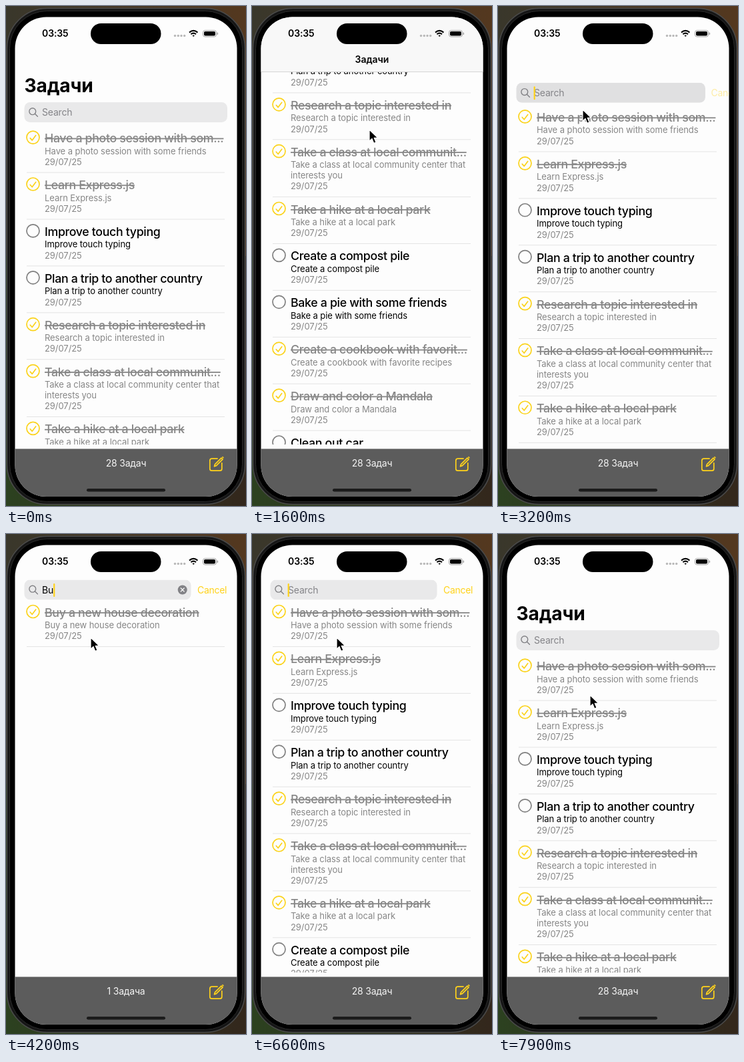
Write an HTML page that moves like this. It is 360 by 748 pixels and loops after 8000 ms.

```html
<!DOCTYPE html>
<html lang="ru">
<head>
<meta charset="utf-8">
<title>Задачи</title>
<style>
html, body { margin: 0; width: 100%; height: 100%; overflow: hidden; background: #17140f; }
svg { display: block; width: 100vw; height: 100vh; }
text { font-family: Inter, "Noto Sans", sans-serif; }
.head { font-size: 17.8px; font-weight: 500; letter-spacing: -.35px; }
.sub, .date { font-size: 13px; letter-spacing: -.07px; }
.date { fill: #868686; }
.done { fill: #868686; }
.done .head { text-decoration: line-through; }
.field { font-size: 14px; letter-spacing: -.2px; }
</style>
</head>
<body>
<svg viewBox="0 0 360 748" xmlns="http://www.w3.org/2000/svg">
  <defs>
    <linearGradient id="wallTop"><stop stop-color="#39372b"/><stop offset="1" stop-color="#54381f"/></linearGradient>
    <linearGradient id="wallLow"><stop stop-color="#2c4120"/><stop offset="1" stop-color="#33271c"/></linearGradient>
    <clipPath id="screen"><rect x="13.5" y="16.500" width="333" height="717.500" rx="47"/></clipPath>
    <clipPath id="listClip"><rect id="listBox" x="13" width="334"/></clipPath>
    <clipPath id="titleClip"><rect x="13" y="98" width="334" height="80"/></clipPath>
    <clipPath id="barClip"><rect id="barBox" x="13" width="334"/></clipPath>
  </defs>
  <rect width="360" height="374" fill="url(#wallTop)"/>
  <rect y="374" width="360" height="374" fill="url(#wallLow)"/>
  <rect x="1.5" y="3.5" width="357" height="742" rx="60" fill="#161616" stroke="#4b4b4b" stroke-width="1.5"/>
  <rect x="5.5" y="7.5" width="349" height="734" rx="56" fill="#000" stroke="#2b2b2b"/>
  <g clip-path="url(#screen)">
    <rect x="13" y="16" width="334" height="719" fill="#fdfdfd"/>
    <g clip-path="url(#listClip)" id="list"></g>

    <g clip-path="url(#titleClip)">
      <text id="title" font-size="28.200" font-weight="700" letter-spacing="-.15">Задачи</text>
    </g>

    <g id="nav">
      <rect x="13" y="16" width="334" height="82" fill="#f8f8f8"/>
      <path d="M13 98.5H347" stroke="#d5d5d5"/>
      <text x="180" y="85" text-anchor="middle" font-size="14" font-weight="600">Задачи</text>
    </g>

    <g clip-path="url(#barClip)">
      <rect id="bar" x="27.5" rx="8.5"/>
      <g id="barBody">
        <g fill="none" stroke="#808084" stroke-width="1.4" stroke-linecap="round">
          <circle cx="39.8" cy="-1.3" r="4.9"/><path d="M43.4 2.3l4 4"/>
        </g>
        <text id="hint" class="field" x="54" y="5" fill="#848488">Search</text>
        <text id="query" class="field" x="54" y="5"></text>
        <rect id="caret" y="-9.5" width="2.200" height="20" rx="1" fill="#ffd21a"/>
        <g id="clear">
          <circle cx="264.7" r="7" fill="#828286"/>
          <path d="M262.2 -2.5l5 5m0-5l-5 5" stroke="#f4f4f4" stroke-width="1.3" stroke-linecap="round"/>
        </g>
        <text id="cancel" class="field" y="5" fill="#ffd21a" style="letter-spacing:-.3px">Cancel</text>
      </g>
    </g>

    <rect x="13" y="662.500" width="334" height="73" fill="#5c5c5c"/>
    <text id="count" class="field" x="180" y="689" text-anchor="middle" fill="#f4f4f4"></text>
    <g fill="none" stroke="#ffd21a" stroke-width="1.7" stroke-linecap="round" stroke-linejoin="round">
      <path d="M317 677.2h-8.200q-3 0-3 3v12q0 3 3 3h12q3 0 3-3v-8.500"/>
      <path d="M312.500 688.800l1-3.200 9.500-9.500 2 2-9.500 9.500zM324.900 674.800l.9.9"/>
    </g>
    <rect x="121" y="722" width="118" height="4.500" rx="2.250" fill="#1b1b1b"/>

    <text x="54" y="46" font-size="14" font-weight="600" letter-spacing="-.1">03:35</text>
    <rect x="127" y="26" width="105.500" height="31" rx="15.500"/>
    <g fill="#b9b9b9">
      <circle cx="253.500" cy="44.500" r="1.700"/><circle cx="258.300" cy="44.500" r="1.700"/>
      <circle cx="263" cy="44.500" r="1.700"/><circle cx="267.700" cy="44.500" r="1.700"/>
    </g>
    <g fill="none" stroke="#000" stroke-width="2.100">
      <path d="M275 39.600q6.200-5.400 12.400 0M277.400 42.300q3.800-3.300 7.600 0"/>
      <path d="M279.500 44.200q1.700-1.300 3.400 0l-1.700 1.800z" fill="#000" stroke="none"/>
    </g>
    <rect x="295.500" y="36.500" width="20" height="9.500" rx="3" fill="none" stroke="#a5a5a5"/>
    <rect x="297" y="38" width="17" height="6.500" rx="1.800"/>
    <path d="M317 39.700q1.500 1.500 0 3.200z" fill="#a5a5a5" stroke="#a5a5a5"/>
  </g>
  <path id="cursor" d="M0 0V17.200L4 13.500 6.700 20.200 10 18.800 7.200 12.300H12.700Z" fill="#000" stroke="#fff" stroke-width="1.200" stroke-linejoin="round"/>
</svg>
<script>
const LOOP = 8000, TOTAL = 28;
const $ = id => document.getElementById(id);
const clamp = v => Math.min(1, Math.max(0, v));
const lerp = (a, b, k) => a + (b - a) * k;
const smooth = k => k * k * (3 - 2 * k);
const cubicOut = k => 1 - (1 - k) ** 3;
const sineOut = k => Math.sin(k * Math.PI / 2);
const linear = k => k;

// Keys are [time, value, ease into this key].
function track(t, keys) {
  if (t <= keys[0][0]) return keys[0][1];
  for (let i = 1; i < keys.length; i++) {
    const [t0, v0] = keys[i - 1], [t1, v1, ease = smooth] = keys[i];
    if (t < t1) return lerp(v0, v1, ease((t - t0) / (t1 - t0)));
  }
  return keys[keys.length - 1][1];
}

const SCROLL = [[850, 0], [1300, 220], [1750, 333, cubicOut], [1800, 333], [2300, -13], [2600, 0]];
const SEARCH = [[3100, 0], [3500, 1, sineOut], [7480, 1], [7880, 0, sineOut]];
const CARET = [[3640, 1], [3800, 0, linear], [3960, 0], [3961, 1], [4840, 1], [5000, 0, linear], [5580, 0], [5700, 1, linear]];
const CURSOR_X = [[100, -16], [700, 180], [900, 180], [1300, 176], [1600, 176], [1800, 170], [2100, 162],
  [2640, 162], [2900, 127], [6600, 127], [7200, 303], [7480, 303], [7860, 138]];
const CURSOR_Y = [[100, 420], [700, 405], [850, 405], [1300, 185], [1600, 185], [1800, 165], [2100, 280],
  [2640, 280], [2900, 155], [6600, 155], [7200, 82], [7480, 82], [7860, 241]];
const TYPING = [[0, ''], [4000, 'B'], [4200, 'Bu'], [4400, 'Buy'], [5800, 'Bu'], [5950, 'B'], [6100, '']];

// [done, title, shortened title, note lines]
const TASKS = [
  [1, 'Have a photo session with some friends', 'Have a photo session with som...'],
  [1, 'Learn Express.js'],
  [0, 'Improve touch typing'],
  [0, 'Plan a trip to another country'],
  [1, 'Research a topic interested in'],
  [1, 'Take a class at local community center that interests you', 'Take a class at local communit...',
    ['Take a class at local community center that', 'interests you']],
  [1, 'Take a hike at a local park'],
  [0, 'Create a compost pile'],
  [0, 'Bake a pie with some friends'],
  [1, 'Create a cookbook with favorite recipes', 'Create a cookbook with favorit...'],
  [1, 'Draw and color a Mandala'],
  [0, 'Clean out car'],
  [1, 'Buy a new house decoration']
];

function makeRow([done, name, short = name, lines = [name]]) {
  const el = document.createElementNS('http://www.w3.org/2000/svg', 'g');
  const extra = (lines.length - 1) * 15.9;
  const mark = done ? '<path d="M36.300 0l2.900 3.300 5.500-7.300" stroke-linecap="round" stroke-linejoin="round"/>' : '';
  const notes = lines.map((s, i) => `<text class="sub" x="58" y="${24 + i * 16.2}">${s}</text>`).join('');
  el.innerHTML = `<g fill="none" stroke="${done ? '#fbd31c' : '#808080'}" stroke-width="1.700">
      <circle cx="40.500" cy="-1" r="9.500"/>${mark}</g>
    <g class="${done ? 'done' : ''}"><text class="head" x="58" y="6.500">${short}</text>${notes}</g>
    <text class="date" x="58" y="${40.3 + extra}">29/07/25</text>
    <path d="M31 ${51.5 + extra}H328" stroke="#e4e4e4"/>`;
  $('list').append(el);
  return { el, key: name.toLowerCase(), height: 69.9 + extra };
}
const rows = TASKS.map(makeRow);

function set(id, attrs) {
  for (const k in attrs) $(id).setAttribute(k, attrs[k]);
}

function countLabel(n) {
  return n + (n === 1 ? ' Задача' : n < 5 ? ' Задачи' : ' Задач');
}

function drawList(query, top, clipTop) {
  let y = top, n = 0;
  for (const row of rows) {
    const show = row.key.includes(query.toLowerCase());
    row.el.style.display = show ? '' : 'none';
    if (!show) continue;
    row.el.setAttribute('transform', `translate(0 ${y})`);
    y += row.height;
    n++;
  }
  set('listBox', { y: clipTop, height: 656 - clipTop });
  $('count').textContent = countLabel(query ? n : TOTAL);
}

function drawHeader(t, s, p, query) {
  const pull = Math.max(0, -s), up = Math.max(0, s);
  const titleY = 129 + pull - Math.max(0, up - 40) - 46 * p;
  const size = 1 + pull / 1300;
  set('title', { transform: `translate(27.500 ${titleY}) scale(${size})`, opacity: clamp(1 - p * 3.5) });
  set('nav', { opacity: clamp((s - 68) / 14) });

  const top = lerp(144, 68.5, p) + pull;
  const height = Math.max(0, 30 - up);
  const pressed = t > 3000 && t < 3400;
  set('barBox', { y: top, height });
  set('bar', { y: top, height, width: lerp(304.5, 250, p), fill: pressed ? '#e0e0e1' : '#e9e9ea' });
  set('barBody', { transform: `translate(0 ${top + 15 - up / 2})`, opacity: clamp(1 - up / 16) });

  $('query').textContent = query;
  set('hint', { opacity: query ? 0 : 1 });
  set('clear', { opacity: query ? 1 : 0 });
  set('cancel', { x: lerp(340, 287, p), opacity: p });
  const typed = query ? $('query').getComputedTextLength() + .5 : 0;
  set('caret', { x: 53.6 + typed, opacity: t > 3100 && t < 7480 ? track(t, CARET) : 0 });
}

function draw(t) {
  const s = track(t, SCROLL), p = track(t, SEARCH);
  const query = TYPING.filter(k => k[0] <= t).pop()[1];
  drawList(query, lerp(197.6, 117, p) - s, Math.max(98, lerp(179, 98, p) - s));
  drawHeader(t, s, p, query);
  set('cursor', { transform: `translate(${track(t, CURSOR_X)} ${track(t, CURSOR_Y)})` });
}

const start = performance.now();
function tick() {
  draw((performance.now() - start) % LOOP);
  requestAnimationFrame(tick);
}
tick();
</script>
</body>
</html>
```
